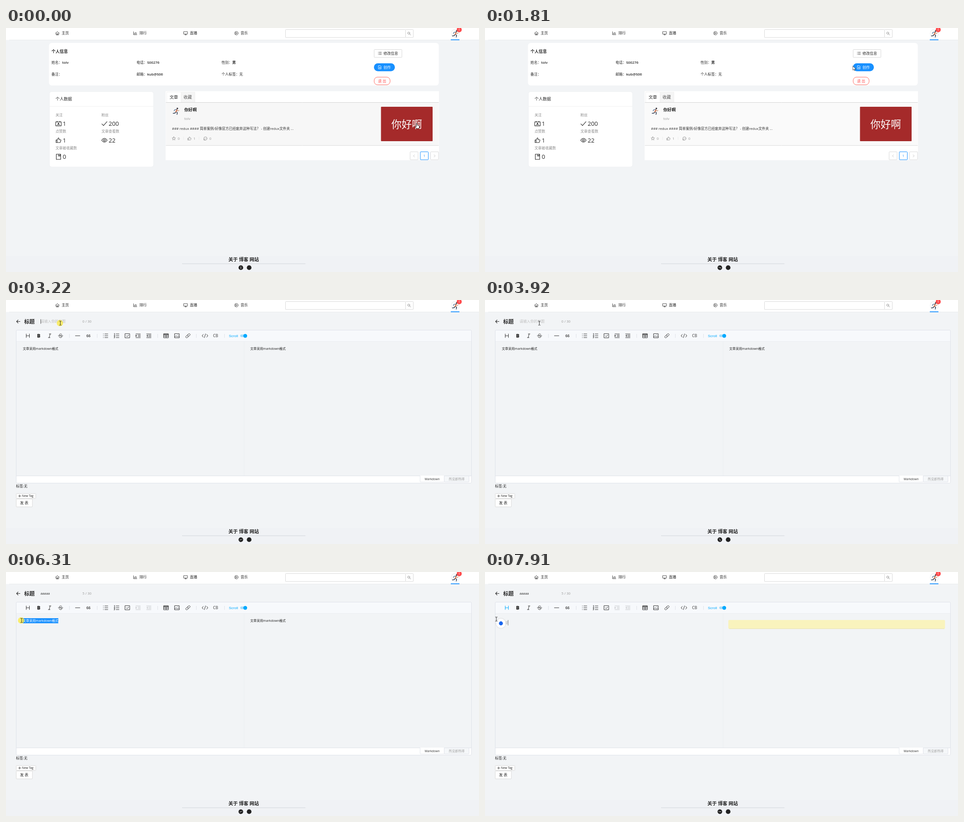
Write an HTML page with a canvas that moves like this. It is 1040 px wide and 539 px high and loops after 7.99 s.

```html
<!DOCTYPE html>
<html lang="zh-CN">
<head>
<meta charset="utf-8">
<title>博客</title>
<style>
html, body { margin: 0; width: 100%; height: 100%; overflow: hidden; background: #f2f4f6; }
canvas { display: block; width: 1040px; height: 539px; }
</style>
</head>
<body>
<canvas id="stage" width="1040" height="539"></canvas>
<script>
const g = document.getElementById('stage').getContext('2d');
const LOOP = 7990, STEP = 71;
const FONT = '"Open Sans", "Noto Sans CJK SC", "Noto Sans CJK", sans-serif';
const INK = '#262626', GREY = '#999', BLUE = '#1890ff', SKY = '#00a9ff', RULE = '#dfe2e9';
const USER = 'tolv', PHONE = '500276', MAIL = 'kub@506';

const T = { leave: 1000, open: 1830, focus: 3230, edit: 6020, popup: 6500, clear: 6900, hash: 7580, heading: 7640 };
const KEYS = [4480, 4760, 5070, 5300, 5520];
const PRESSES = [[1600, 1790], [3200, 3350], [6020, 6430]];
const PATH = [
  [0, 903, 211], [880, 903, 211], [1000, 902, 176], [1170, 866, 120], [1400, 842, 94], [1550, 830, 86],
  [1750, 830, 86], [2150, 690, 74], [2590, 435, 58], [2860, 250, 40], [3020, 140, 33], [3170, 119.5, 51],
  [5850, 119.5, 51], [6000, 116, 107], [6050, 116, 107], [6280, 34.5, 107], [6430, 25, 104], [LOOP + STEP, 25, 104]
];

function text(s, x, y, size, color = INK, weight = 400, align = 'left') {
  g.font = `${weight} ${size}px ${FONT}`;
  g.fillStyle = color;
  g.textAlign = align;
  g.fillText(s, x, y + size * 0.36);
}

function rect(x, y, w, h, fill, stroke, r = 0) {
  g.beginPath();
  g.roundRect(x, y, w, h, r);
  if (fill) { g.fillStyle = fill; g.fill(); }
  if (stroke) { g.strokeStyle = stroke; g.lineWidth = 1; g.stroke(); }
}

function disc(x, y, r, fill) {
  g.beginPath();
  g.arc(x, y, r, 0, 7);
  g.fillStyle = fill;
  g.fill();
}

function line(x1, y1, x2, y2, color) {
  g.beginPath();
  g.moveTo(x1, y1);
  g.lineTo(x2, y2);
  g.strokeStyle = color;
  g.lineWidth = 1;
  g.stroke();
}

// Stroked icon, path given around its centre
function icon(d, x, y, color = INK, width = 0.9, scale = 1, fill) {
  g.save();
  g.translate(x, y);
  g.scale(scale, scale);
  const p = new Path2D(d);
  if (fill) { g.fillStyle = fill; g.fill(p); }
  g.strokeStyle = color;
  g.lineWidth = width / scale;
  g.lineJoin = g.lineCap = 'round';
  g.stroke(p);
  g.restore();
}

const ring = r => `M${r} 0A${r} ${r} 0 1 1 ${-r} 0A${r} ${r} 0 1 1 ${r} 0`;
const I = {
  home: 'M-4 0L0-3.6L4 0M-2.9-.8V3.6H2.9V-.8M-.8 3.6V1H.8V3.6',
  chart: 'M-3.6-3.4V3.3H3.8M-1.6 1.8V-.2M.4 1.8V-2M2.5 1.8V-1.2',
  screen: 'M-4-3.4H4V1.8H-4ZM0 1.8V3.6M-2 3.6H2',
  play: ring(3.8) + 'M-1-1.7L1.7 0L-1 1.7Z',
  search: 'M1.4-.7A2.3 2.3 0 1 1-3.2-.7A2.3 2.3 0 1 1 1.4-.7M.8 1L3.4 3.6',
  list: 'M-1.6-2.6H3.5M-1.6 0H3.5M-1.6 2.6H3.5M-3.5-2.6H-3.2M-3.5 0H-3.2M-3.5 2.6H-3.2',
  file: 'M-2.8-3.6H1L2.8-1.8V3.6H-2.8ZM-1.3 .8H1.3M0-.5V2.1',
  badge: 'M-6-4.2H6V4.6H-6ZM-3-5.6V-3.2M3-5.6V-3.2M-2 2.6L0-2.2L2 2.6M-1.3 1.1H1.3',
  tick: 'M-5.6 .4L-2 4.2L5.6-4.6',
  like: 'M-5.4-.6H-3V5H-5.4ZM-3-.6L-.4-5.2C1.6-5.4 1.4-3.4 .9-1.2H4.4C6-1 5.4 .4 5 1.4L4 4.2Q3.7 5 3 5H-3',
  eye: 'M-6 0Q0-8.4 6 0Q0 8.4-6 0Z' + ring(2),
  book: 'M-4.8-5.8H4.8V5.8H-4.8ZM.2-5.8V-1.4L1.8-2.6L3.4-1.4V-5.8',
  star: 'M0-3.8L1.1-1.3L3.8-1.1L1.8 .7L2.4 3.4L0 2L-2.4 3.4L-1.8 .7L-3.8-1.1L-1.1-1.3Z',
  chat: ring(3.6) + 'M-3.4 1.4L-3.5 3.6H0M-1.6 0H-1.5M0 0H.1M1.6 0H1.7',
  back: 'M3.8 0H-3.5M-.4-3.3L-3.7 0L-.4 3.3',
  head: 'M-3.5-4V4M3.5-4V4M-3.5 0H3.5',
  italic: 'M-1-4H3M-3 4H1M1-4L-1 4',
  strike: 'M3-2.6C2-4.6-3-4.4-2.8-1.8C-2.5 .5 3 -.4 3 2C3 4.8-2.4 4.8-3.2 2.4M-5 0H5',
  dash: 'M-5 0H5',
  ul: 'M-1.8-4H5M-1.8 0H5M-1.8 4H5M-5-4H-4.6M-5 0H-4.6M-5 4H-4.6',
  ol: 'M-1-4H5.5M-1 0H5.5M-1 4H5.5M-5-4.7L-4.2-5.2V-2.4M-5.2-.9H-3.6L-5.2 1H-3.6M-5.2 2.7H-3.7L-4.5 3.8Q-3 4.4-5.2 5.2',
  check: 'M-5-4.6H5V4.6H-5ZM-2.6 0L-.6 2L2.8-1.8',
  indent: 'M-5-4H5M0-1.2H5M0 1.4H5M-5 4.2H5M-4.8-1.6L-2.6 .1L-4.8 1.8Z',
  outdent: 'M-5-4H5M0-1.2H5M0 1.4H5M-5 4.2H5M-2.6-1.6L-4.8 .1L-2.6 1.8Z',
  table: 'M-5-4.5H5V4.5H-5ZM-5-1.6H5M-5 1.4H5M0-1.6V4.5M-5-3H5',
  image: 'M-5-4.5H5V4.5H-5ZM-5 2.6L-2 0L.6 2.4L2.6 .6L5 2.8M2-2H2.3',
  link: 'M-.8-2L1.6-4.2C3.6-5.6 6-3 4.3-1.2L1.9 1C.8 1.8-.4 1.6-1 .9M.8 2L-1.6 4.2C-3.6 5.6-6 3-4.3 1.2L-1.9-1C-.8-1.8 .4-1.6 1-.9',
  code: 'M-3.6-3.2L-6.4 0L-3.6 3.2M3.6-3.2L6.4 0L3.6 3.2M1.2-4.2L-1.2 4.2',
  arrow: 'M0 0V10.4L2.4 8.2L4 11.8L5.7 11L4.1 7.6H7.4Z',
  hand: 'M-1 0Q0-1.2 1 0V4.2Q2.2 3.2 2.8 4.6Q4 3.8 4.6 5.2Q6 4.6 6.2 6V9Q6 11 5 12H-.4L-3.6 7.4Q-3.4 5.8-1.8 6.8L-1 7.6Z',
  beam: 'M-2-4.6Q0-4.6 0-3.8Q0-4.6 2-4.6M0-3.8V3.8M-2 4.6Q0 4.6 0 3.8Q0 4.6 2 4.6'
};

function runner(x, y) {
  icon('M-.5 1.5L-2.5 4.5L-6.5 5', x, y, '#27344a', 1.5);
  icon('M0 1.5L2.8 3.6L2 7.4', x, y, '#27344a', 1.5);
  icon('M1.6-3L-.2 1.4', x, y, '#d9744c', 2.3);
  icon('M1-3.4L-3-3L-4.4-.4', x, y, '#3d5f86', 1.2);
  icon('M2-2.6L3.8-.2L6.4-1.4', x, y, '#b9835e', 1.1);
  disc(x + 2.8, y - 5.8, 1.7, '#33313a');
}

function header() {
  rect(0, 0, 1040, 26.5, '#fff');
  line(7, 26.5, 1040, 26.5, '#e9ebed');
  [['home', 113, '主页'], ['chart', 284, '排行'], ['screen', 395, '直播'], ['play', 506.5, '音乐']]
    .forEach(([name, x, label]) => {
      icon(I[name], x, 11.5, INK, 0.8);
      text(label, x + 9.2, 11.5, 8.1);
    });
  rect(614.5, 3.5, 264, 17.5, '#fff', '#d9d9d9', 1);
  rect(878.5, 3.5, 17, 17.5, '#fff', '#d9d9d9', 1);
  icon(I.search, 886.5, 12, '#777', 0.8);
  disc(988, 12, 9.5, '#dfe1e4');
  disc(988, 12, 8.8, '#fff');
  runner(988, 12.5);
  disc(996.5, 3.8, 5.6, '#ff4d4f');
  text('1', 996.5, 3.8, 6.5, '#fff', 400, 'center');
  rect(978, 25.2, 19, 1.8, BLUE);
}

function footer(t) {
  rect(0, 504, 1040, 35, '#f0f2f5');
  text('关于 博客 网站', 522.5, 511, 10.3, '#222', 700, 'center');
  line(387, 520.8, 658.5, 520.8, '#d2d5da');
  const turn = 0.36 * t - 0.9e-6 * t * t;
  g.save();
  g.translate(516.4, 529.4);
  g.rotate(turn * Math.PI / 180);
  disc(0, 0, 5.1, '#222');
  rect(-0.45, -0.8, 0.9, 3.4, '#fff');
  disc(0, -2.1, 0.65, '#fff');
  g.restore();
  disc(534.6, 529.4, 5.1, '#222');
}

function infoCard(t) {
  rect(94.5, 33, 857, 94, '#fff', null, 6);
  text('个人信息', 100, 51.5, 9, INK, 700);
  const field = (label, value, x, y, weight = 600) => {
    text(label, x, y, 7.8);
    text(value, x + label.length * 7.8, y, 7.8, INK, weight);
  };
  field('姓名：', USER, 100, 76.5);
  field('电话：', PHONE, 287, 76.5);
  field('性别：', '男', 474, 76.5);
  field('备注：', '', 100, 102.5);
  field('邮箱：', MAIL, 287, 102.5);
  field('个人标签：', '无', 474, 102.5, 400);
  rect(809.5, 47.5, 61, 17.5, '#fff', '#d9d9d9', 1);
  icon(I.list, 822, 56, INK, 0.7);
  text('修改信息', 830, 56, 8);
  rect(809, 78, 46, 17.5, overButton(...cursorAt(t)) ? '#40a9ff' : BLUE, null, 8.5);
  icon(I.file, 822, 86.8, '#fff', 0.8);
  text('创作', 830, 86.8, 8, '#fff');
  rect(809.5, 108.5, 35, 17, '#fff', '#ff6c63', 7.5);
  text('退 出', 827, 117, 8, '#ff4d4f', 400, 'center');
}

function dataCard() {
  rect(95.5, 140.5, 229, 166.5, '#fff', '#eff1f3', 5);
  text('个人数据', 109, 157, 9);
  line(96, 173, 324, 173, '#f0f0f0');
  [
    ['关注', 'badge', '1', 109, 192], ['粉丝', 'tick', '200', 210, 192],
    ['点赞数', 'like', '1', 109, 228.5], ['文章查看数', 'eye', '22', 210, 228.5],
    ['文章被收藏数', 'book', '0', 109, 265]
  ].forEach(([label, name, value, x, y]) => {
    text(label, x, y, 7.8, '#8c8c8c');
    icon(I[name], x + 6.4, y + 19.5, INK, 1.1);
    text(value, x + 15.8, y + 19.7, 13);
  });
}

function articles(t) {
  rect(351, 139.5, 601, 152.5, '#fff');
  rect(353.5, 141.5, 31.5, 23, '#fff', '#f0f0f0');
  rect(385.5, 141.5, 30, 23, '#f5f5f5', '#f0f0f0');
  text('文章', 369, 152.5, 9.2, INK, 400, 'center');
  text('收藏', 399.5, 152.5, 9.2, '#555', 400, 'center');
  const v = Math.round(247 + 3 * Math.min(1, Math.max(0, (t - T.leave) / 200)));
  rect(351.5, 165, 600, 94.5, `rgb(${v},${v},${v})`);
  line(351.5, 164.5, 951.5, 164.5, '#d4d4d4');
  line(351.5, 259.5, 951.5, 259.5, '#dcdcdc');
  runner(374, 183.5);
  text('你好啊', 392, 181, 9.1, '#222', 600);
  text(USER, 392, 200.5, 7.8, GREY);
  text('### redux #### 简单案例/好像官方已经废弃这种写法？ - 创建redux文件夹 ...', 365, 222.5, 7.65, '#333');
  [['star', 369, '0', 1], ['like', 403.5, '1', 0.68], ['chat', 438.5, '0', 1]].forEach(([name, x, n, s]) => {
    icon(I[name], x, 244, '#888', 0.8, s);
    text(n, x + 8.6, 244, 8, GREY);
  });
  line(390.5, 240, 390.5, 247, '#ececec');
  line(424.5, 240, 424.5, 247, '#ececec');
  rect(824.5, 174, 113.5, 76, '#a52a2a', null, 1);
  text('你好啊', 881, 213, 22.5, '#fff', 400, 'center');
  rect(888.5, 273.5, 17.5, 17.5, '#fff', '#d9d9d9', 1);
  rect(911, 273.5, 17.5, 17.5, '#fff', BLUE, 1);
  rect(933.5, 273.5, 17.5, 17.5, '#fff', '#d9d9d9', 1);
  icon('M1.4-2.4L-1.4 0L1.4 2.4', 897, 282.5, '#bbb', 0.8);
  icon('M-1.4-2.4L1.4 0L-1.4 2.4', 942.5, 282.5, '#bbb', 0.8);
  text('1', 919.8, 282.5, 8, BLUE, 400, 'center');
}

const blink = (t, since) => t >= since && Math.floor((t - since) / 530) % 2 === 0;

function titleRow(t) {
  icon(I.back, 27, 47.5, INK, 1.1);
  text('标题', 40, 48, 11.6, INK, 700);
  const typed = KEYS.filter(k => t >= k).length;
  if (typed) text('a'.repeat(typed), 76, 47.5, 7.3);
  else text('请输入你的标题', 76, 47.5, 7.9, '#bfbfbf');
  text(`${typed} / 30`, 168, 47.5, 7.7, GREY);
  if (t < T.edit && blink(t, typed ? KEYS[typed - 1] : T.focus)) {
    rect(76 + typed * 4, 42.5, 0.8, 10, INK);
  }
}

function toolbar(t) {
  rect(23, 67, 1000, 24.5, '#f7f9fc');
  line(23, 91.5, 1023, 91.5, '#ebedf2');
  const y = 79, dim = t >= T.edit ? '#c4c6c9' : '#333';
  icon(I.head, 48, y, t >= T.heading ? SKY : '#333', 1);
  text('B', 72, y, 11, '#222', 800, 'center');
  [['italic', 96], ['strike', 120], ['dash', 157.5], ['ul', 219], ['ol', 243], ['check', 267],
    ['indent', 290.5, dim], ['outdent', 314, dim], ['table', 352], ['image', 376], ['link', 400], ['code', 437.5]]
    .forEach(([name, x, color = '#333']) => icon(I[name], x, y, color, 1));
  text('66', 181.3, y + 0.3, 8, '#333', 600, 'center');
  text('CB', 460.8, y, 8.6, '#333', 400, 'center');
  [139.5, 200.5, 333.5, 418.5, 480.5].forEach(x => line(x, 75, x, 83.5, '#dfe2e8'));
  g.font = '8px Arial, "Liberation Sans", sans-serif';
  g.fillStyle = SKY;
  g.textAlign = 'left';
  g.fillText('Scroll', 490, 82);
  rect(515, 76.3, 13, 5.6, '#a5dcfa', null, 2.8);
  disc(526, 79.2, 4.2, SKY);
}

function editor(t) {
  titleRow(t);
  toolbar(t);
  line(523.5, 92, 523.5, 388, '#ebeef0');
  const body = '文章采用markdown格式';
  if (t < T.focus) rect(535, 99.5, 476.5, 17, '#f9f3bd', null, 2);
  if (t < T.clear) {
    text(body, 37, 107.5, 7.1, '#222');
    text(body, 537, 107.5, 7.1, '#222');
    if (t >= T.edit) {
      const left = Math.min(115, Math.max(37, cursorAt(t)[0]));
      g.save();
      g.beginPath();
      g.rect(left, 102, 115 - left, 11.5);
      g.clip();
      rect(37, 102, 78, 11.5, BLUE);
      text(body, 37, 107.5, 7.1, '#fff');
      g.restore();
    }
  } else if (t < T.hash) {
    if (blink(t, T.clear)) rect(37, 102.5, 0.8, 10, INK);
  } else {
    text('##', 37, 112, 11.2, '#aaa', 300);
    rect(50.5, 106, 0.7, 12, '#555');
  }
  if (t >= T.heading) {
    rect(535, 106, 476.5, 19.5, '#f9f3bd', null, 2);
    line(537, 125.2, 1010, 125.2, '#e6e1b5');
  }
  rect(23, 389, 1000, 15.5, '#fff');
  line(23, 388.5, 1023, 388.5, RULE);
  rect(910.5, 388.5, 53, 13.5, '#fff', '#e3e6ec', 1);
  rect(963.5, 388.5, 54.5, 13.5, '#f5f7f9', RULE, 1);
  line(911, 388.5, 963, 388.5, '#fff');
  text('Markdown', 937, 395.5, 6.7, '#333', 400, 'center');
  text('所见即所得', 991, 395.5, 6.9, GREY, 400, 'center');
  rect(22.5, 66.5, 1001, 338, null, RULE, 2);
  text('标签:无', 22, 411.5, 7.7);
  rect(22.5, 427.5, 43, 11, '#fff', '#d9d9d9', 1);
  icon('M-2.6 0H2.6M0-2.6V2.6', 30, 433, INK, 0.8);
  text('New Tag', 35, 433, 6.5);
  rect(22.5, 439.5, 35.5, 17.5, '#fff', '#d9d9d9', 1);
  text('发 表', 40, 448.3, 8.2, INK, 400, 'center');
  if (t >= T.popup) {
    g.save();
    g.shadowColor = 'rgba(0,0,0,.18)';
    g.shadowBlur = 3;
    disc(35, 113.5, 10.4, '#fff');
    g.restore();
    disc(35, 113.5, 4.4, '#1a66ee');
  }
}

function cursorAt(t) {
  const i = PATH.findIndex(p => p[0] > t);
  const [t0, x0, y0] = PATH[i - 1], [t1, x1, y1] = PATH[i];
  const k = (t - t0) / (t1 - t0);
  return [x0 + (x1 - x0) * k, y0 + (y1 - y0) * k];
}

const overButton = (x, y) => x > 809 && x < 855 && y > 78 && y < 96;

function cursor(t) {
  const [x, y] = cursorAt(t);
  if (PRESSES.some(([a, b]) => t >= a && t < b)) disc(x - 1, y, 7, 'rgba(252,234,50,.7)');
  const onLink = t < T.open && (y > 165 || overButton(x, y));
  const onInput = t >= T.open && ((x < 165 && y > 41 && y < 54) || y > 92);
  if (onLink) icon(I.hand, x, y, '#222', 0.9, 0.92, '#fff');
  else if (onInput) icon(I.beam, x, y, '#222', 0.9);
  else icon(I.arrow, x, y, '#333', 0.8, 0.86, '#fff');
}

function draw(now) {
  const step = Math.floor(now % LOOP / STEP);
  const t = step ? (step + 0.5) * STEP : 0;
  rect(0, 0, 1040, 539, '#f2f4f6');
  header();
  footer(t);
  if (t < T.open) {
    infoCard(t);
    dataCard();
    articles(t);
  } else {
    editor(t);
  }
  cursor(t);
}

const start = performance.now();
function tick() {
  draw(performance.now() - start);
  requestAnimationFrame(tick);
}
tick();
</script>
</body>
</html>
```
